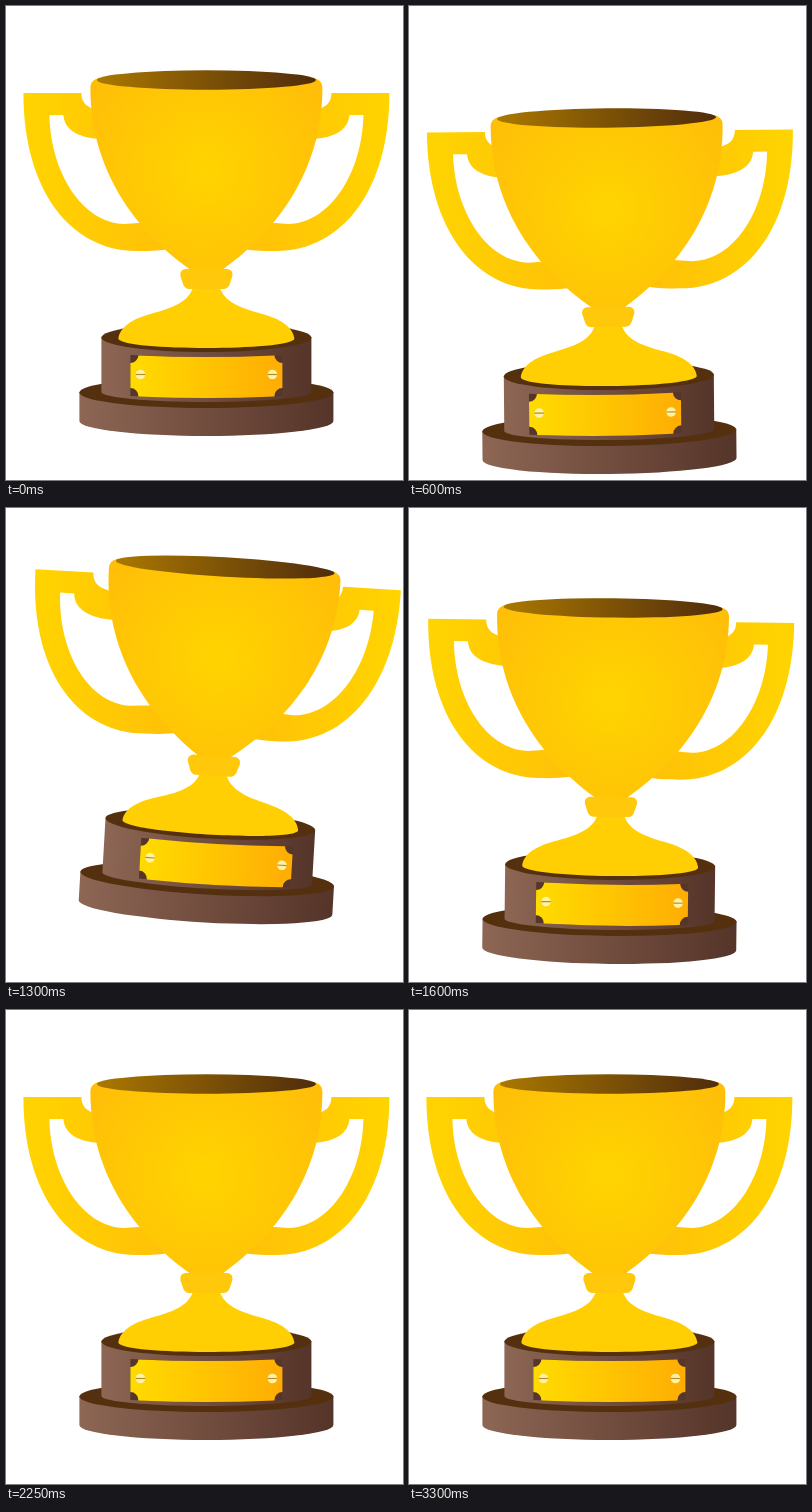
An HTML page that plays this animation: 397 by 474 pixels, repeating every 9500 ms.

```html
<!DOCTYPE html>
<html lang="en">
<head>
<meta charset="utf-8">
<title>Trophy</title>
<style>
  html, body { margin: 0; width: 100%; height: 100%; overflow: hidden; background: #fff; }
  svg { display: block; width: 100%; height: 100%; }
</style>
</head>
<body>
<svg viewBox="0 0 397 474">
  <defs>
    <radialGradient id="gold" gradientUnits="userSpaceOnUse" cx="198" cy="165" r="135">
      <stop offset="0" stop-color="#ffd400"/>
      <stop offset="1" stop-color="#ffbf08"/>
    </radialGradient>
    <linearGradient id="arm" gradientUnits="userSpaceOnUse" x1="17" y1="0" x2="165" y2="0">
      <stop offset="0" stop-color="#ffd400"/>
      <stop offset="1" stop-color="#ffc008"/>
    </linearGradient>
    <linearGradient id="inside">
      <stop offset="0" stop-color="#aa7800"/>
      <stop offset="1" stop-color="#502c0c"/>
    </linearGradient>
    <linearGradient id="wood">
      <stop offset="0" stop-color="#8d6654"/>
      <stop offset="1" stop-color="#553429"/>
    </linearGradient>
    <linearGradient id="plate">
      <stop offset="0" stop-color="#ffdb00"/>
      <stop offset="1" stop-color="#ffad04"/>
    </linearGradient>
    <path id="bowl" d="M84 82C84 76 87 74 92 72H308C313 74 316 76 316 82C316 165 270 225 217 263V266H183V263C130 225 84 165 84 82Z"/>
    <path id="handle" fill="url(#arm)" d="M17 87H75C75 96 80 102 92 104L110 106V134L92 133C70 131 58 123 57 109H43C44 165 75 217 118 218L145 216L180 240L163 243C150 245 140 245 130 245C65 245 17 185 17 87Z"/>
    <g id="screw">
      <circle r="4.8" fill="#fff3a6"/>
      <path d="M-4.8 0H4.8" stroke="#b98a2c" stroke-width="1.2"/>
    </g>
    <clipPath id="bowlClip"><use href="#bowl"/></clipPath>
  </defs>

  <g id="trophy">
    <g id="handles">
      <use href="#handle"/>
      <use href="#handle" transform="matrix(-1 0 0 1 400 0)"/>
    </g>

    <path fill="url(#wood)" d="M73 386V415A127 15 0 0 0 327 415V386Z"/>
    <ellipse cx="200" cy="386.5" rx="127" ry="15.5" fill="#54300f"/>
    <path fill="url(#wood)" d="M95 331V386A105 10 0 0 0 305 386V331Z"/>
    <ellipse cx="200" cy="331.5" rx="105" ry="14.5" fill="#54300f"/>

    <g id="plaque">
      <path fill="#57362a" d="M124 349Q200 353 276 349V390Q200 394 124 390Z"/>
      <path fill="url(#plate)" d="M132 349.4Q200 352.6 268 349.4A8 8 0 0 0 276 357V382A8 8 0 0 0 268 390.4Q200 393.6 132 390.4A8 8 0 0 0 124 382V357A8 8 0 0 0 132 349.4Z"/>
      <use href="#screw" x="134" y="368.5"/>
      <use href="#screw" x="266" y="368.5"/>
    </g>

    <path fill="#ffcf03" d="M187 280C183 296 166 302 144 308C126 313 113 321 112 333C118 345 282 345 288 333C287 321 274 313 256 308C234 302 217 296 213 280Z"/>
    <use href="#bowl" fill="url(#gold)"/>
    <path fill="#ffc80a" d="M179 263H221Q227 264 226 270L223 279Q221 283 217 283H183Q179 283 177 279L174 270Q173 264 179 263Z"/>
    <g clip-path="url(#bowlClip)">
      <path id="shine" fill="#fff166" d="M0 75H40L54 268H14Z"/>
    </g>
    <ellipse cx="200" cy="74" rx="109.5" ry="9.7" fill="url(#inside)"/>
    <path id="spark" fill="#fffde0" d="M0 -36Q4 -5 30 0Q4 5 0 36Q-4 5 -30 0Q-4 -5 0 -36Z"/>
  </g>
</svg>
<script>
  const LOOP = 9500, STEP = 50;
  const $ = id => document.getElementById(id);
  const move = (id, value) => $(id).setAttribute('transform', value);

  // Smooth track through [time, value] keys, without overshoot.
  function track(...keys) {
    const last = keys.length - 1;
    const slope = i => (keys[i + 1][1] - keys[i][1]) / (keys[i + 1][0] - keys[i][0]);
    const tangents = keys.map((k, i) => {
      if (i === 0 || i === last) return 0;
      const a = slope(i - 1), b = slope(i);
      return a * b <= 0 ? 0 : 2 * a * b / (a + b);
    });
    return t => {
      if (t <= keys[0][0]) return keys[0][1];
      if (t >= keys[last][0]) return keys[last][1];
      const i = keys.findIndex(k => k[0] > t) - 1;
      const [t0, v0] = keys[i], [t1, v1] = keys[i + 1];
      const h = t1 - t0, u = (t - t0) / h, w = 1 - u;
      return w * w * (1 + 2 * u) * v0 + u * u * (3 - 2 * u) * v1
        + h * u * w * (w * tangents[i] - u * tangents[i + 1]);
    };
  }

  const lift = track([0, 0], [480, 43], [600, 38], [950, -61], [975, -62],
    [1300, -15.5], [1550, 27], [1850, 8], [2100, 0]);
  const tilt = track([450, 0], [600, -.5], [850, -4.4], [950, -2.83], [1000, -1.6],
    [1260, 3.5], [1300, 3.3], [1750, 0]);
  const turn = track([350, 0], [600, -4], [800, -8.5], [950, -7.5],
    [1250, 8.2], [1300, 7.8], [1800, 0]);
  const glint = track([2300, 0], [2950, 1], [3300, 0]);

  function draw(t) {
    const side = turn(t);
    move('trophy', `translate(.4 ${lift(t)}) rotate(${tilt(t)} 200 400)`);
    move('plaque', `translate(${side} 0)`);
    move('handles', `translate(${-.8 * side} 0)`);
    move('shine', `translate(${142 + (t - 1850) * .46} 0)`);
    move('spark', `translate(281 101) scale(${glint(t)})`);
  }

  const start = performance.now();
  function tick() {
    const t = (performance.now() - start) % LOOP;
    draw(Math.floor(t / STEP) * STEP);
    requestAnimationFrame(tick);
  }
  tick();
</script>
</body>
</html>
```
